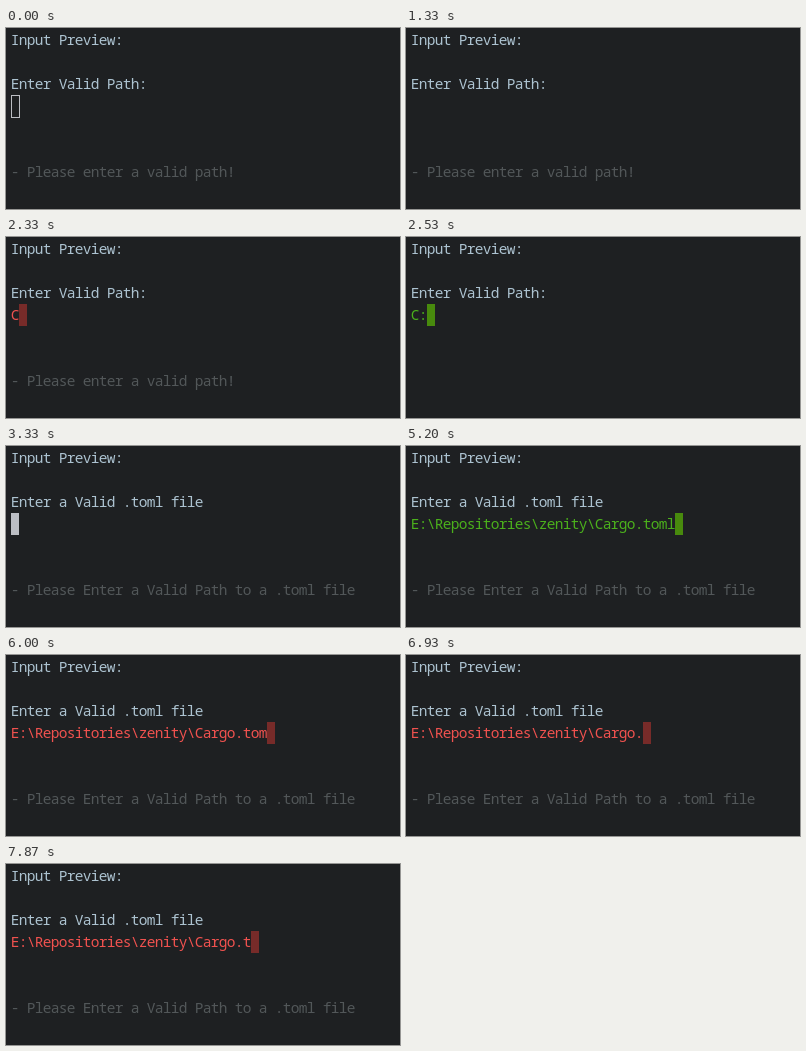
Write an HTML page that moves like this. It is 394 px wide and 181 px high and loops after 8000 ms.

```html
<!DOCTYPE html>
<html lang="en">
<head>
<meta charset="utf-8">
<title>Input preview</title>
<style>
  html, body { margin: 0; width: 100%; height: 100%; overflow: hidden; background: #1e2022; }
  svg { display: block; }
  /* 0.6em advance, tightened to the 8px terminal cell */
  text {
    font: 14.5px "Noto Sans Mono", "DejaVu Sans Mono", monospace;
    letter-spacing: -0.7px;
    fill: #adc3d1;
  }
  #hint { fill: #525759; }
  .plain { --text: #adc3d1; --block: #bcbec4; }
  .good { --text: #4bb01c; --block: #488a0d; }
  .bad { --text: #f0524f; --block: #772b29; }
  #entry { fill: var(--text); }
  #cursor { fill: var(--block); }
  #outline { fill: none; stroke: #bcbec4; }
</style>
</head>
<body>
<svg width="394" height="181" viewBox="0 0 394 181">
  <text x="4.65" y="17">Input Preview:</text>
  <text id="prompt" x="4.65" y="61"></text>
  <g id="line" class="plain">
    <rect id="cursor" y="67" width="8" height="22"/>
    <rect id="outline" x="5.5" y="67.5" width="8" height="22"/>
    <text id="entry" x="4.65" y="83"></text>
  </g>
  <text id="hint" x="4.65" y="149"></text>
</svg>
<script>
const LOOP = 8000, LEFT = 5, CELL = 8;
const $ = id => document.getElementById(id);
const file = "E:\\Repositories\\zenity\\Cargo.toml";
const cut = n => file.slice(0, file.length - n);

const forms = [
  { from: 0, prompt: "Enter Valid Path:", hint: "- Please enter a valid path!" },
  { from: 2530, prompt: "Enter Valid Path:", hint: "" },
  { from: 3330, prompt: "Enter a Valid .toml file", hint: "- Please Enter a Valid Path to a .toml file" }
];

// start time, typed text, line style, cursor
const steps = [
  [0, "", "plain", "outline"],
  [330, "", "plain", "block"],
  [1330, "", "plain", "off"],
  [1800, "", "plain", "block"],
  [2330, "C", "bad", "block"],
  [2530, "C:", "good", "block"],
  [3330, "", "plain", "block"],
  [3870, "", "plain", "off"],
  [4330, "", "plain", "block"],
  [4870, "", "plain", "off"],
  [5200, file, "good", "block"],
  [6000, cut(1), "bad", "block"],
  [6530, cut(1), "bad", "off"],
  [6600, cut(2), "bad", "block"],
  [6800, cut(3), "bad", "block"],
  [6930, cut(4), "bad", "block"],
  [7870, cut(3), "bad", "block"]
];

const show = (id, on) => $(id).setAttribute("visibility", on ? "visible" : "hidden");
let last;

function draw(now) {
  const t = now % LOOP;
  const step = steps.findLast(s => s[0] <= t);
  if (step !== last) {
    last = step;
    const [, typed, style, cursor] = step;
    const form = forms.findLast(f => f.from <= t);
    $("prompt").textContent = form.prompt;
    $("hint").textContent = form.hint;
    $("entry").textContent = typed;
    $("line").setAttribute("class", style);
    $("cursor").setAttribute("x", LEFT + typed.length * CELL);
    show("cursor", cursor === "block");
    show("outline", cursor === "outline");
  }
}

const start = performance.now();
function tick() {
  draw(performance.now() - start);
  requestAnimationFrame(tick);
}
tick();
</script>
</body>
</html>
```
